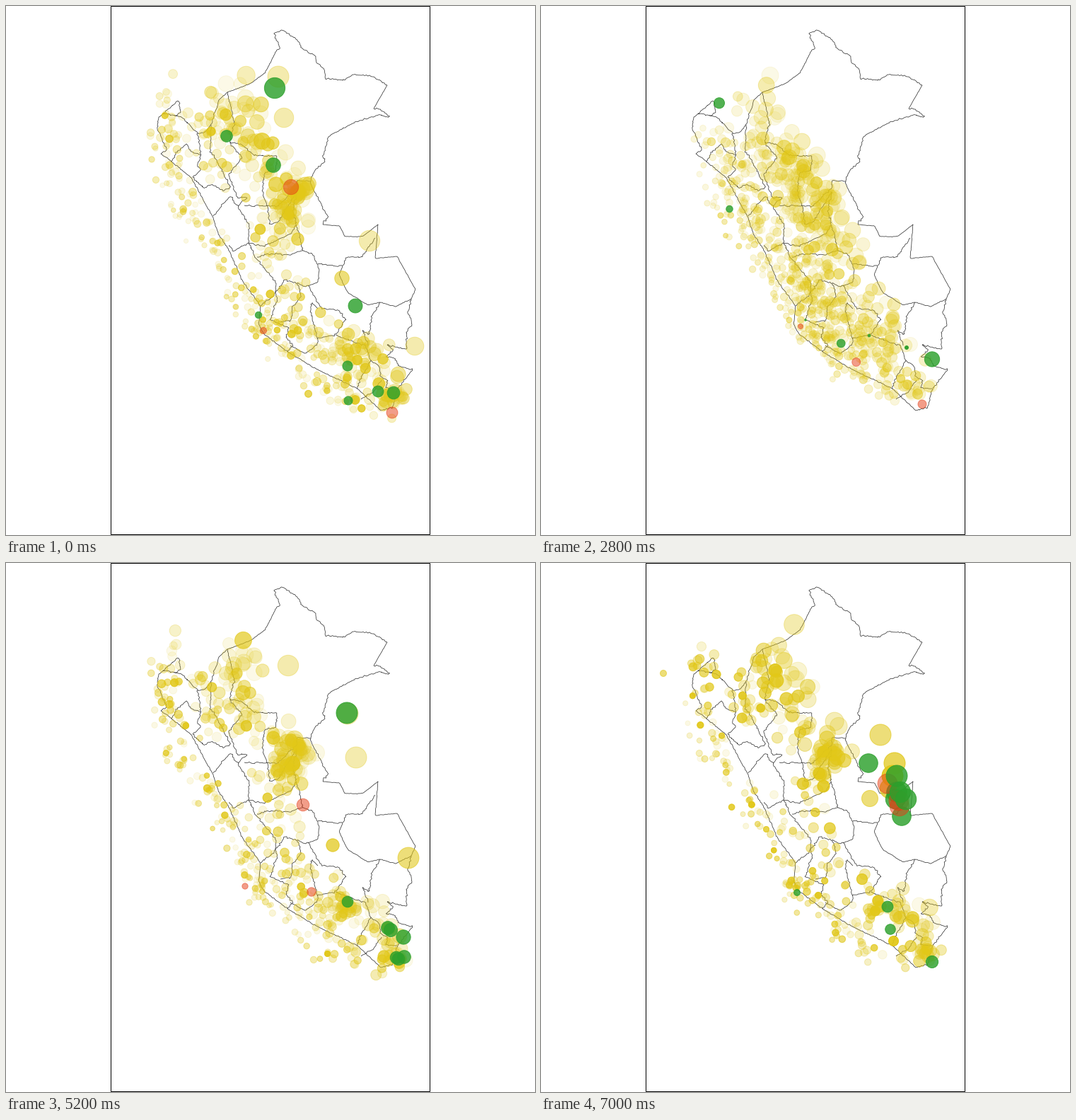
A matplotlib script for the animation above (8000 ms loop, 748 by 748 pixels).

```python
import numpy as np
import matplotlib.pyplot as plt
from matplotlib.animation import FuncAnimation
from matplotlib.collections import LineCollection
from matplotlib.colors import to_rgb
from matplotlib.patches import Rectangle

SIZE, DPI = 748, 88
PX = 72 / DPI  # one pixel in points
YELLOW, GREEN, RED = "#e2c818", "#2ca02c", "#e63c14"
STATES, SLOTS = 5, 780

fig = plt.figure(figsize=(SIZE / DPI, SIZE / DPI), dpi=DPI, facecolor="white")
ax = fig.add_axes([0, 0, 1, 1])
ax.set(xlim=(0, SIZE), ylim=(SIZE, 0))
ax.axis("off")
ax.add_patch(Rectangle((148.5, 0.5), 451, 747, fill=False, ec="black",
                       lw=PX, snap=False))


# ---- map borders -------------------------------------------------------
def along(points, s):
    """Points at distances s along a polyline; s=None returns its length."""
    p = np.array(points, float)
    d = np.r_[0, np.cumsum(np.hypot(*np.diff(p, axis=0).T))]
    if s is None:
        return d[-1]
    return np.c_[np.interp(s, d, p[:, 0]), np.interp(s, d, p[:, 1])]


lines = []
rough_rng = np.random.default_rng(3)


def border(*points, rough=0.65):
    """Polyline through a few key points, with small river-like wiggles."""
    n = max(2, int(along(points, None) / 2.2))
    xy = along(points, np.linspace(0, along(points, None), n))
    xy[1:-1] += np.clip(rough_rng.normal(0, rough, (n - 2, 2)), -1.5, 1.5)
    lines.append(xy)


# frontier, clockwise from the north-west
border((301, 133), (313, 122), (345, 110), (366, 95), (383, 62), rough=0.2)
border((383, 62), (388, 60), (379, 38), (391, 34), (412, 48), (420, 61),
       (438, 70), (439, 80), (449, 87), (453, 103), (476, 105), (491, 97),
       (515, 98), (539, 112))
border((539, 112), (520, 145), rough=0.1)
border((520, 145), (531, 147), (542, 157), (526, 154), (488, 166), (457, 184),
       (448, 212), (451, 220), (434, 235), (430, 250), (455, 298), (448, 309))
border((448, 309), (472, 311), (479, 326), (504, 326), (526, 309), (522, 357),
       (553, 354), (579, 401), (573, 414), rough=0.2)
border((573, 414), (569, 433), (575, 452), (567, 456), (566, 486), (538, 479),
       (548, 487), (537, 495), (550, 499), (556, 510), (574, 514), (565, 527),
       (553, 541), (547, 568), (530, 572))
border((530, 572), (497, 541), (440, 514), (398, 489), (365, 464), (357, 450),
       (360, 424), (335, 390), (315, 345), (300, 322), (293, 300), (262, 243),
       (234, 220), (219, 209), rough=0.4)
border((219, 209), (228, 203), (214, 175), (215, 158), (244, 133), (247, 150),
       (238, 155), (222, 152))
# inner borders, north
border((238, 155), (250, 158), (271, 180), (280, 178), (290, 168), (301, 133))
border((271, 180), (275, 211), (271, 228), (276, 232), (264, 242))
border((234, 220), (240, 208), (256, 195), (262, 206), (275, 211))
border((264, 242), (280, 258), (292, 252), (308, 262), (317, 256), (304, 230),
       (289, 205), (290, 168))
border((313, 122), (323, 165), (316, 193), (334, 215), (314, 238), (328, 272),
       (341, 270), (328, 283))
border((316, 193), (334, 196), (350, 211), (383, 212), (382, 233), (366, 235),
       (362, 262), (370, 284))
border((293, 297), (317, 269), (328, 283), (344, 310), (343, 335), (320, 347),
       (316, 338))
# centre
border((337, 282), (385, 283), (411, 257), (411, 247), (431, 248))
border((370, 284), (373, 308), (385, 306), (411, 262), (406, 290), (420, 346),
       (434, 350), (443, 374), (441, 390))
border((343, 335), (365, 340), (404, 321), (410, 310))
border((355, 355), (370, 350), (400, 352), (420, 346))
border((343, 335), (352, 355), (380, 388), (383, 415), (374, 444), (400, 455),
       (396, 468), (405, 480), (398, 489))
border((360, 424), (379, 408), (395, 387), (425, 397), (441, 390))
border((441, 365), (476, 368), (481, 355), (503, 355), (522, 328))
border((476, 368), (471, 380), (483, 405), (512, 423), (529, 419), (551, 425),
       (573, 414), rough=0.3)
# south
border((412, 392), (418, 410), (405, 425), (404, 445), (388, 447))
border((427, 395), (446, 428), (470, 430), (481, 443), (466, 465), (440, 470),
       (430, 430), (432, 420), (441, 428))
border((402, 480), (424, 492), (440, 478), (440, 470))
border((466, 465), (492, 475), (508, 480), (516, 501), (500, 530), (497, 541))
border((529, 419), (517, 440), (513, 465), (504, 458), (512, 480))
border((516, 501), (528, 510), (530, 525), (540, 530), (538, 540), (553, 541))
border((502, 556), (520, 545), (531, 529))

ax.add_collection(LineCollection(lines, colors="#333333",
                                 linewidths=0.75 * PX))

# ---- yellow bubbles ----------------------------------------------------
COAST = [(232, 118), (230, 190), (242, 270), (285, 320), (330, 392),
         (360, 455), (415, 502), (500, 562)]
INLAND = [(312, 118), (338, 175), (362, 240), (405, 265), (382, 310),
          (378, 370), (405, 450), (475, 485), (525, 500), (546, 570)]
HOTSPOTS = [(412, 264), (400, 290), (476, 485), (545, 550), (360, 458)]
COUNTS = [600, 430, 520, 540, 400]

# lone bubbles away from the main belts
LONE = [
    [(514, 332), (578, 481), (421, 537), (475, 385), (393, 158), (385, 100)],
    [(458, 321), (467, 388), (497, 429), (174, 122), (355, 100)],
    [(507, 306), (473, 312), (522, 406), (168, 183), (367, 514), (398, 151)],
    [(495, 275), (483, 213), (462, 399), (435, 561), (569, 417), (399, 145)],
    [(480, 243), (500, 283), (497, 301), (493, 319), (465, 333), (173, 156),
     (358, 87)],
]


def radius(xy):
    """Bubbles grow with the distance from the coast."""
    inland = np.clip(0.86 * xy[:, 0] - 0.53 * xy[:, 1], 0, None)
    return np.minimum(3.8 + inland ** 2 / 6500, 15)


def belt(rng, path, n, spread):
    xy = along(path, rng.uniform(0, along(path, None), n))
    return xy + np.clip(rng.normal(0, 1, (n, 2)), -2, 2) * spread


def bubble_state(k):
    """Rows of x, y, radius, opacity, padded to SLOTS by repeating rows."""
    rng = np.random.default_rng(40 + k)
    n = COUNTS[k]
    spots = np.array(HOTSPOTS)[rng.integers(len(HOTSPOTS), size=n // 6)]
    xy = np.vstack([belt(rng, COAST, int(n * 0.36), 13),
                    belt(rng, INLAND, int(n * 0.38), 18),
                    belt(rng, [(282, 155), (300, 240)], n // 20, 13),
                    spots + rng.normal(0, 8, spots.shape)])
    xy = np.clip(xy, (190, 95), (566, 583))
    r = radius(xy) * rng.uniform(0.75, 1.1, len(xy))
    alpha = np.clip(0.09 + rng.exponential(0.13, len(xy)), 0, 0.75)
    lone = np.array(LONE[k], float)
    rows = np.vstack([np.c_[xy, r, alpha],
                      np.c_[lone, radius(lone), np.full(len(lone), 0.35)]])
    rows = np.vstack([rows, rows[rng.integers(len(rows),
                                              size=SLOTS - len(rows))]])
    return rng.permutation(rows)


# ---- green and red marks, each a path through the five states ----------
PATHS = [
    (GREEN, (526, 545), (556, 503), (544, 489), (563, 557), (510, 358)),
    (GREEN, (484, 558), (500, 574), (197, 186), (555, 560), (501, 334)),
    (GREEN, (312, 184), (230, 224), (376, 476), (483, 479), (503, 324)),
    (RED, (403, 256), (461, 502), (400, 508), (420, 342), (490, 312)),
    (RED, (364, 459), (367, 453), None, (432, 465), (507, 344)),
    (RED, (546, 575), (539, 563), None, (338, 457), (506, 336)),
    (GREEN, (483, 509), None, (517, 483), (540, 516), (508, 324)),
    (GREEN, (548, 547), None, (517, 483), (544, 519), (516, 334)),
    (GREEN, (378, 225), None, (464, 466), (552, 558), (503, 301)),
    (GREEN, (380, 116), (217, 145), (357, 114), (482, 212), (553, 564)),
    (GREEN, (357, 437), None, (374, 444), (562, 529), (463, 283)),
    (GREEN, (494, 424), None, None, None, (490, 486)),
    (GREEN, None, None, None, None, (494, 518)),
    (GREEN, None, None, None, None, (362, 466)),
]


def mark_state(k):
    xy = np.array([p[k + 1] or (0, 0) for p in PATHS], float)
    shown = xy[:, 0] > 0
    alpha = [0.82 if p[0] == GREEN else 0.5 for p in PATHS]
    return np.c_[xy, radius(xy) * shown, alpha]


states = [np.vstack([bubble_state(k), mark_state(k)]) for k in range(STATES)]
rgb = np.array([to_rgb(YELLOW)] * SLOTS + [to_rgb(p[0]) for p in PATHS])

# ---- animation ---------------------------------------------------------
dots = ax.scatter(*np.zeros((2, len(rgb))), s=1, linewidths=PX, zorder=3)


def tween(a, b, t):
    """Straight move; a mark without a partner grows or shrinks in place."""
    start = np.where(a[:, 2:3] > 0, a, b * (1, 1, 0, 1))
    end = np.where(b[:, 2:3] > 0, b, a * (1, 1, 0, 1))
    return start + (end - start) * t


def update(n):
    # each state rests for six steps, then moves on in three
    k, step = divmod(n + 1, 9)
    t = max(0, step - 5) / 4
    now = tween(states[k], states[k + 1], t) if t else states[k]
    colors = np.c_[rgb, np.where(now[:, 2] > 0, now[:, 3], 0)]
    dots.set_offsets(now[:, :2])
    dots.set_sizes((2 * now[:, 2] * PX) ** 2)
    dots.set_facecolors(colors)
    dots.set_edgecolors(colors)
    return [dots]


anim = FuncAnimation(fig, update, frames=40, interval=200, repeat=True,
                     repeat_delay=0, blit=False)
plt.show()
```
